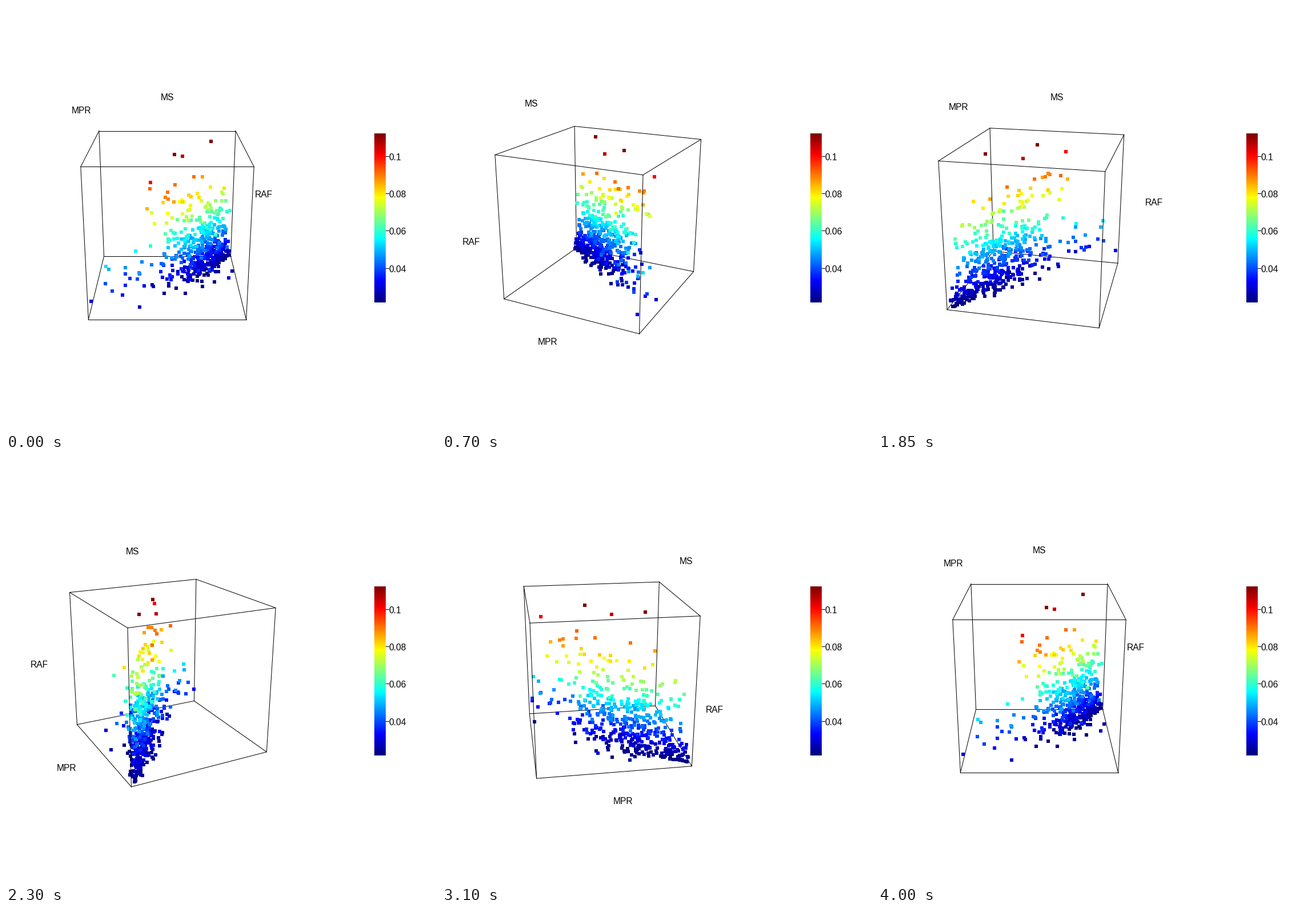
These frames come from a looping animation (753 px wide and 744 px high, 4050 ms). A matplotlib script:

```python
import numpy as np
import matplotlib.pyplot as plt
from itertools import combinations, product
from matplotlib.animation import FuncAnimation
from matplotlib.colors import LinearSegmentedColormap

W, H, DPI = 753, 744, 100
PX = 72 / DPI                       # one pixel in points
FRAMES, STEP = 81, 4.5              # degrees turned per frame
CX, CY, SCALE, DIST = 282.5, 372, 128.2, 8.28
TILT = np.radians(20)
ZMAX = 0.97                         # heights run from -ZMAX to ZMAX
JET = LinearSegmentedColormap.from_list("rainbow9", [
    "#00007F", "#0000FF", "#007FFF", "#00FFFF", "#7FFF7F",
    "#FFFF00", "#FF7F00", "#FF0000", "#7F0000"], N=100)

plt.rcParams["font.family"] = ["Liberation Sans", "DejaVu Sans"]
rng = np.random.default_rng(7)


def diagonal(away, slope, spread, height):
    """Points that run from one corner of the box towards the opposite one."""
    side = 0.04 + away * slope + rng.normal(0, spread, len(away))
    return np.column_stack([ZMAX - np.clip(side, 0, 1.94), away - ZMAX, height])


def make_points():
    rise = np.abs(rng.normal(0, 0.54, 440))
    rise = np.where(rise > 1.2, rise * 0.5, rise)
    away = 1.5 * rng.beta(1.15 + 1.6 * rise, 2.3)
    cloud = diagonal(away, 0.61, 0.03 + 0.13 * away, rise - ZMAX)
    upper = diagonal(rng.uniform(0.3, 1.75, 26), 0.68, 0.14,
                     rng.uniform(0.17, 0.54, 26))
    lower = diagonal(rng.uniform(1.25, 1.95, 24), 0.8, 0.16,
                     rng.uniform(-0.92, -0.15, 24))
    # The four highest points and the one in the far corner
    extremes = [(0.6, -0.43, 0.97), (0.09, 0.26, 0.96), (0.2, -0.08, 0.85),
                (-0.2, 0.81, 0.75), (-0.96, 0.95, -0.77)]
    return np.vstack([cloud, upper, lower, extremes])


def project(pts, angle):
    """Screen x, screen y and nearness of points on the turned stage."""
    x, y, z = np.asarray(pts, float).T
    c, s = np.cos(angle), np.sin(angle)
    u, v = x * c + y * s, y * c - x * s
    near = v * np.cos(TILT) + z * np.sin(TILT)
    k = SCALE / (1 - near / DIST)
    up = z * np.cos(TILT) - v * np.sin(TILT)
    return CX + k * u, CY - k * up, near


def label_spots(deg):
    """Anchors of the three axis names on the current outline edges."""
    sx = -1 if 0 < deg <= 180 else 1
    sy = 1 if 90 < deg <= 270 else -1
    on_top = abs(np.sin(np.radians(deg))) < np.tan(TILT)
    side = (-1.1 * sx, 0, 1.48) if on_top else (1.5 * sx, 0, -1.11)
    return [(0, 1.1 * sy, 1.48), side, (1.48 * sx, 1.08 * sy, 0)]


points = make_points()
colors = JET((points[:, 2] + ZMAX) / (2 * ZMAX))
corners = np.array(list(product((-1, 1), repeat=3)))
edges = [(a, b) for a, b in combinations(range(8), 2)
         if np.abs(corners[a] - corners[b]).sum() == 2]

fig = plt.figure(figsize=(W / DPI, H / DPI), dpi=DPI, facecolor="white")
ax = fig.add_axes([0, 0, 1, 1])
ax.axis("off")

CAP = 5.5                           # from the middle of a capital to its foot


def put_text(text, x, y, ha="center"):
    return ax.text(x, y + CAP, text, ha=ha, va="baseline",
                   fontsize=15.6 * PX, color="black", zorder=5)


# Colour bar
ax.imshow(np.arange(100)[::-1, None], cmap=JET, aspect="auto",
          interpolation="nearest", extent=(645, 665, 519.5, 224))
for value in (0.04, 0.06, 0.08, 0.1):
    y = 262.5 + (0.1 - value) * 3267
    ax.plot([665, 670], [y, y], color="black", lw=PX)
    put_text(f"{value:g}", 670.5, y + 1.5, ha="left")

dots = ax.scatter(points[:, 0], points[:, 1], s=(6 * PX) ** 2, marker="s",
                  linewidths=0, zorder=3)
lines = [ax.plot([], [], color="black", lw=PX)[0] for _ in edges]
names = [put_text(name, 0, 0) for name in ("MS", "MPR", "RAF")]
ax.set_xlim(0, W)
ax.set_ylim(H, 0)


def draw(i):
    deg = i * STEP
    angle = np.radians(deg)

    x, y, near = project(points, angle)
    order = np.argsort(near)
    dots.set_offsets(np.column_stack([x, y]).round()[order])
    dots.set_facecolors(colors[order])

    x, y, near = project(corners, angle)
    for line, (a, b) in zip(lines, edges):
        line.set_data([x[a], x[b]], [y[a], y[b]])
        line.set_zorder(4 if near[a] + near[b] > 0 else 2)

    x, y, _ = project(label_spots(deg), angle)
    for name, tx, ty in zip(names, x, y):
        name.set_position((tx, ty + CAP))
    return [dots, *lines, *names]


anim = FuncAnimation(fig, draw, frames=FRAMES, interval=50, repeat=True,
                     repeat_delay=0, blit=False)
plt.show()
```
